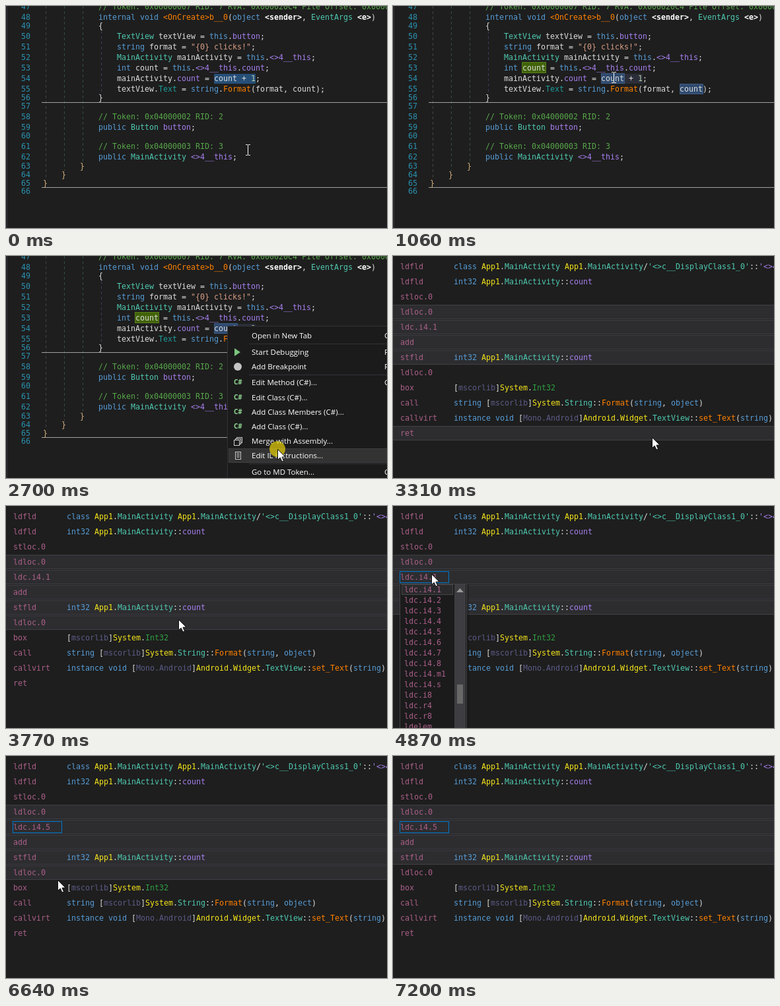
An HTML page with a canvas for the animation above (8000 ms loop, 577 by 337 pixels).

```html
<!DOCTYPE html>
<html lang="en">
<head>
<meta charset="utf-8">
<title>Editing IL instructions</title>
<style>
html, body { margin: 0; height: 100%; overflow: hidden; background: #1e1e1e; }
canvas { display: block; }
</style>
</head>
<body>
<canvas id="stage" width="577" height="337"></canvas>
<script>
const ctx = document.getElementById('stage').getContext('2d');
const W = 577, H = 337, LOOP = 8000, CHAR = 7;
const MONO = '11.63px "DejaVu Sans Mono", monospace';
const UI = '11.5px "Open Sans", sans-serif';

// Coloured text: runs split by "|", the first character of a run picks its colour.
const COLORS = {
  w: '#dcdcdc', k: '#569cd6', t: '#4ec9b0', o: '#ff8000', p: '#a67fee', g: '#57a64a',
  c: '#1f9c9c', n: '#b5cea8', y: '#f5e51b', s: '#2fa043', m: '#5b5b88', i: '#ab5f88',
  b: '#ffffff', r: '#d6b080', q: '#d69d85'
};

// Each line: centre y, indent, text. Numbering starts at 47.
const CODE = [
  [1, 3, 'g// Token: 0x06000007 RID: 7 RVA: 0x000020C4 File Offset: 0x000002C4'],
  [17, 3, 'kinternal void |o<OnCreate>b__0|w(|kobject |b<sender>|w, |tEventArgs |b<e>|w)'],
  [30, 3, 'w{'],
  [46, 4, 'tTextView |wtextView = |kthis|w.|pbutton|w;'],
  [62, 4, 'kstring |wformat = |q"{0} clicks!"|w;'],
  [78, 4, 'tMainActivity |wmainActivity = |kthis|w.|p<>4__this|w;'],
  [94, 4, 'kint |wcount = |kthis|w.|p<>4__this|w.|pcount|w;'],
  [110, 4, 'wmainActivity.|pcount|w = count + |n1|w;'],
  [126, 4, 'wtextView.|cText|w = |kstring|w.|oFormat|w(format, count);'],
  [139, 3, 'w}'],
  [152, 0, 'w'],
  [168, 3, 'g// Token: 0x04000002 RID: 2'],
  [184, 3, 'kpublic |tButton |pbutton|w;'],
  [197, 0, 'w'],
  [213, 3, 'g// Token: 0x04000003 RID: 3'],
  [229, 3, 'kpublic |tMainActivity |p<>4__this|w;'],
  [243, 2, 'r}'],
  [256, 1, 'r}'],
  [269, 0, 'r}'],
  [281, 0, 'w']
];

const COUNT = 'kint32 |yApp1|w.|tMainActivity|w::|pcount';
const IL = [
  ['ldfld', "kclass |yApp1|w.|tMainActivity |yApp1|w.|tMainActivity|w/|t'<>c__DisplayClass1_0'|w::|p'<>4__this'"],
  ['ldfld', COUNT],
  ['stloc.0'],
  ['ldloc.0'],
  ['ldc.i4.1'],
  ['add'],
  ['stfld', COUNT],
  ['ldloc.0'],
  ['box', 'w[|mmscorlib|w]|ySystem|w.|sInt32'],
  ['call', 'kstring |w[|mmscorlib|w]|ySystem|w.|tString|w::|oFormat|w(|kstring|w, |kobject|w)'],
  ['callvirt', 'kinstance void |w[|mMono.Android|w]|yAndroid|w.|yWidget|w.|tTextView|w::|oset_Text|w(|kstring|w)'],
  ['ret']
];

const OPCODES = [...'12345678'].map(n => 'ldc.i4.' + n)
  .concat('ldc.i4.m1', 'ldc.i4.s', 'ldc.i8', 'ldc.r4', 'ldc.r8', 'ldelem');

// Each entry: centre y, label, icon, first letter of the shortcut.
const MENU = [
  [121, 'Open in New Tab', '', 'C'],
  [146, 'Start Debugging', 'play', 'F'],
  [168, 'Add Breakpoint', 'dot', 'F'],
  [192, 'Edit Method (C#)...', 'C#', 'C'],
  [215, 'Edit Class (C#)...', 'C#', ''],
  [237, 'Add Class Members (C#)...', 'C#', ''],
  [259, 'Add Class (C#)...', 'C#', ''],
  [281, 'Merge with Assembly...', 'merge', ''],
  [303, 'Edit IL Instructions...', 'page', ''],
  [328, 'Go to MD Token...', '', 'C']
];

// Pointer path: time, x, y.
const PATH = [
  [70, 366, 218], [150, 374, 203], [300, 367, 155], [450, 345, 114], [530, 339, 108],
  [600, 339, 108], [670, 334, 110], [1060, 334, 108], [1220, 335, 106], [1380, 337, 110],
  [1690, 359, 154], [1850, 384, 222], [2000, 400, 278], [2150, 411, 292], [2380, 411, 293],
  [2930, 411, 293], [3310, 392, 275], [3460, 371, 224], [3620, 350, 215], [3850, 215, 150],
  [4100, 95, 88], [4230, 70, 83], [4390, 58, 103], [5090, 58, 103], [5450, 63, 140],
  [5750, 73, 176], [5940, 78, 188], [6900, 78, 188], [7200, 130, 258]
];

const CLICKS = [[1220, 1300], [2700, 2900], [4700, 4860], [6490, 6640]];
const within = (t, [from, to]) => t >= from && t < to;

function pointerAt(t) {
  const next = PATH.findIndex(p => p[0] > t);
  if (next === 0) return PATH[0].slice(1);
  if (next < 0) return PATH[PATH.length - 1].slice(1);
  const [t0, x0, y0] = PATH[next - 1], [t1, x1, y1] = PATH[next];
  const f = (t - t0) / (t1 - t0);
  return [Math.round(x0 + (x1 - x0) * f), Math.round(y0 + (y1 - y0) * f)];
}

function rect(x, y, w, h, fill, border) {
  ctx.fillStyle = fill;
  ctx.fillRect(x, y, w, h);
  if (!border) return;
  ctx.strokeStyle = border;
  ctx.strokeRect(x + .5, y + .5, w - 1, h - 1);
}

function text(str, x, y, color, font = MONO) {
  ctx.font = font;
  ctx.fillStyle = color;
  ctx.fillText(str, x, y + 4);
}

function runs(markup, x, y) {
  for (const run of markup.split('|')) {
    const str = run.slice(1);
    text(str, x, y, COLORS[run[0]], run[0] === 'b' ? 'bold ' + MONO : MONO);
    x += str.length * CHAR;
  }
}

function polygon(points, fill, stroke) {
  ctx.beginPath();
  points.forEach(([x, y]) => ctx.lineTo(x, y));
  ctx.closePath();
  ctx.fillStyle = fill;
  ctx.fill();
  if (!stroke) return;
  ctx.strokeStyle = stroke;
  ctx.stroke();
}

function disc(x, y, r, fill) {
  ctx.beginPath();
  ctx.arc(x, y, r, 0, 7);
  ctx.fillStyle = fill;
  ctx.fill();
}

function drawGuide(x, top, bottom, color) {
  ctx.strokeStyle = color;
  ctx.beginPath();
  ctx.moveTo(x + .5, top);
  ctx.lineTo(x + .5, bottom);
  ctx.stroke();
}

function drawCode(t) {
  rect(1, 0, 1, H, '#333337');
  ctx.setLineDash([4, 4]);
  drawGuide(60, 0, 263, '#454545');
  drawGuide(88, 0, 250, '#34503f');
  drawGuide(116, 0, 237, '#34503f');
  drawGuide(144, 38, 134, '#3b3b5e');
  ctx.setLineDash([]);
  rect(54, 146, W, 1, '#a0a0a0');
  rect(54, 275, W, 1, '#a0a0a0');
  const active = t < 1060;
  rect(315, 103, 63, 15, active ? '#264f78' : '#2b2d38');
  if (!active) {
    rect(195, 85, 37, 17, '#416307', '#58801c');
    rect(315, 102, 36, 16, '#2f4a6e', '#3d5c86');
    rect(434, 118, 36, 16, '#2f4a6e', '#3d5c86');
  }
  CODE.forEach(([y, indent, markup], i) => {
    text(47 + i, 23, y, '#2b91af');
    runs(markup, 56 + indent * 4 * CHAR, y);
  });
  if (within(t, [670, 1060])) drawTooltip();
}

function drawTooltip() {
  rect(338, 128, 165, 24, '#252526', '#4d4d50');
  rect(344, 135, 10, 10, '#252526', '#75bfff');
  text('(local variable)', 359, 140, '#dcdcdc', UI);
  text('int', 445, 140, COLORS.k, UI);
  text('count', 463, 140, '#dcdcdc', UI);
}

function drawIcon(name, y) {
  if (name === 'play') polygon([[346, y - 6], [355, y], [346, y + 6]], '#7cc47f');
  if (name === 'dot') disc(351, y, 6, '#c4c4c4');
  if (name === 'C#') text(name, 345, y - 1, '#93d893', 'bold 10px "Open Sans", sans-serif');
  if (name === 'merge') {
    rect(349, y - 6, 9, 9, '#1b1b1c', '#d0d0d0');
    rect(347, y - 4, 9, 9, '#1b1b1c', '#d0d0d0');
    rect(345, y - 2, 9, 9, '#1b1b1c', '#d0d0d0');
  }
  if (name === 'page') {
    rect(347, y - 6, 9, 12, '#1b1b1c', '#d0d0d0');
    for (let k = -4; k <= 3; k += 2) rect(349, y + k, 5, 1, '#c0c0c0');
  }
}

function drawMenu(pointerY) {
  rect(335, 106, W, H, '#1b1b1c', '#333337');
  [133, 180, 315].forEach(y => rect(368, y, W, 1, '#333337'));
  for (const [y, label, icon, key] of MENU) {
    if (pointerY >= y - 11 && pointerY < y + 11) rect(337, y - 11, W, 22, '#333334', '#3e3e40');
    drawIcon(icon, y);
    text(label, 372, y, '#fff', UI);
    text(key, 573, y, '#fff', UI);
  }
}

function drawInstructions(t, pointerY) {
  const listOpen = within(t, [4780, 6640]);
  const hover = listOpen || t >= 7200 ? -1 : Math.floor((pointerY - 5) / 23);
  IL.forEach(([opcode, operand], i) => {
    const y = 16 + 23 * i;
    if (i === hover || (i >= 3 && i <= 6)) {
      rect(0, y - 11, W, 22, '#2d2d30');
      rect(0, y - 11, W, 1, '#3f3f46');
      rect(0, y + 10, W, 1, '#3f3f46');
    }
    if (i === 4 && t >= 4700) rect(10, y - 9, 75, 18, '#2d2d30', '#007acc');
    text(i === 4 && t >= 6640 ? 'ldc.i4.5' : opcode, 11, y, COLORS.i);
    if (operand) runs(operand, 92, y);
  });
  if (listOpen) drawList(pointerY);
}

function drawList(pointerY) {
  rect(11, 118, 104, H, 'rgba(0,0,0,.2)');
  rect(10, 118, 102, H, '#1b1b1c', '#434346');
  const hover = Math.max(0, Math.floor((pointerY - 119) / 16));
  rect(13, 119 + hover * 16, 78, 16, '#2a2a2c', '#464649');
  OPCODES.forEach((name, i) => text(name, 17, 127 + 16 * i, COLORS.i));
  rect(93, 119, 17, H, '#3e3e42');
  polygon([[96, 131], [101.5, 125], [107, 131]], '#999');
  rect(97, 271, 9, 29, '#686868');
}

function drawPointer(t, x, y) {
  if (CLICKS.some(c => within(t, c))) disc(x, y, 12, 'rgba(222,200,10,.75)');
  if (t < 1220) {
    rect(x - 3, y - 8, 3, 1, '#fff');
    rect(x + 1, y - 8, 3, 1, '#fff');
    rect(x, y - 7, 1, 15, '#fff');
    rect(x - 3, y + 8, 3, 1, '#fff');
    rect(x + 1, y + 8, 3, 1, '#fff');
    return;
  }
  const arrow = [[0, 0], [0, 16], [3.7, 12.6], [6.5, 18.6], [9, 17.5], [6.4, 11.7], [11.4, 11.4]];
  polygon(arrow.map(([dx, dy]) => [x + dx + .5, y + dy + .5]), '#fff', '#111');
}

function draw() {
  const t = performance.now() % LOOP;
  const [x, y] = pointerAt(t);
  rect(0, 0, W, H, '#1e1e1e');
  if (t < 2930) drawCode(t);
  else drawInstructions(t, y);
  if (within(t, [1300, 2760])) drawMenu(y);
  if (t < 7200) drawPointer(t, x, y);
  requestAnimationFrame(draw);
}
draw();
</script>
</body>
</html>
```
